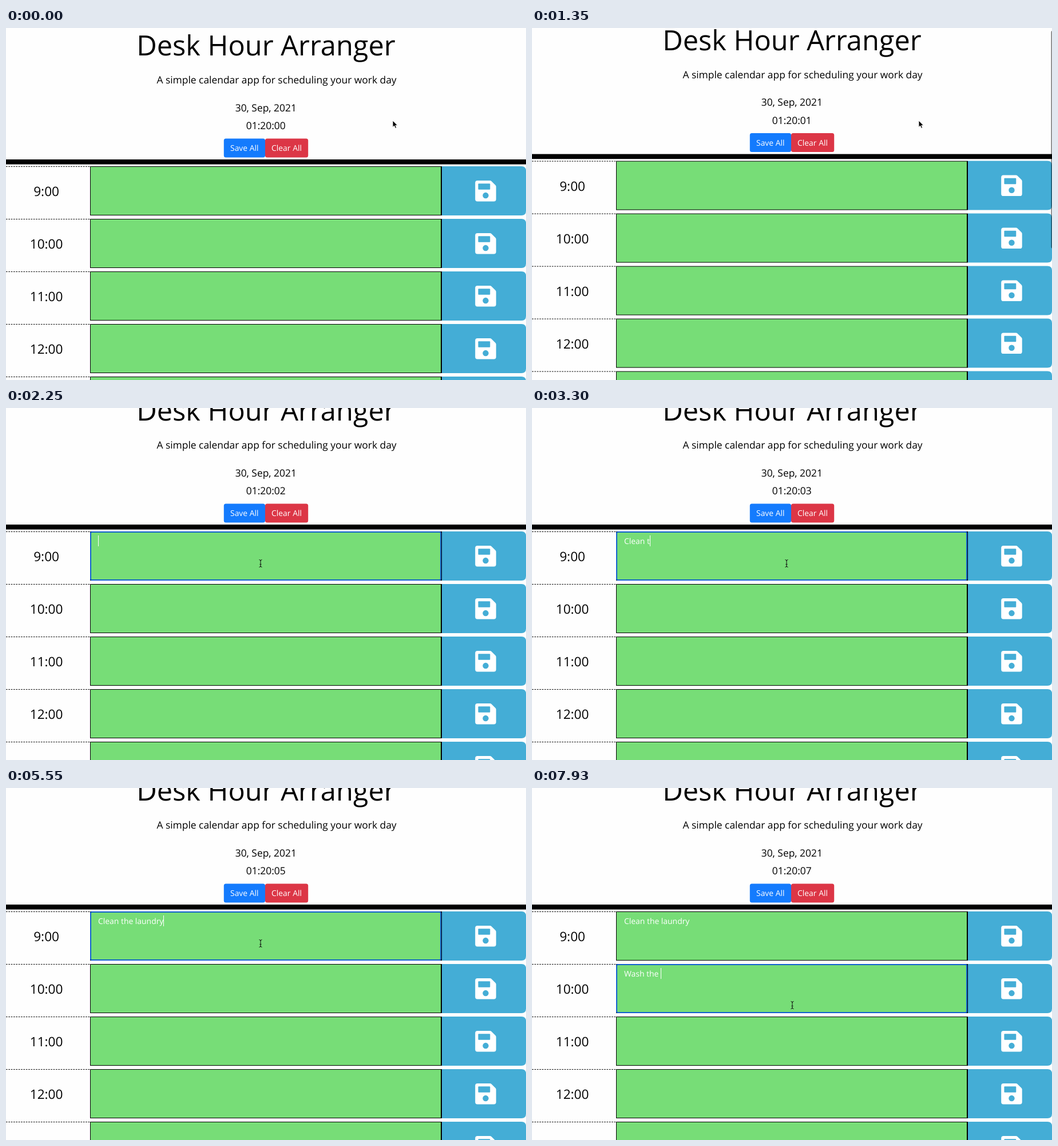
Animation, 909 px wide and 616 px high, one loop 8000 ms. Source, as an HTML page:

```html
<!DOCTYPE html>
<html lang="en">
<head>
<meta charset="utf-8">
<title>Day planner</title>
<style>
  html, body { margin: 0; width: 100%; height: 100%; overflow: hidden; background: #fefefe; }
  svg { display: block; width: 909px; height: 616px; }
  text {
    font-family: "Open Sans", "Noto Sans", sans-serif;
    text-rendering: geometricPrecision;
    white-space: pre;
  }
  .mid { text-anchor: middle; }
  .lead { font-size: 17.4px; }
  .small { font-size: 13.92px; fill: #fff; }
  .hour { font-size: 22.6px; }
</style>
</head>
<body>
<svg viewBox="0 0 909 616">
  <defs>
    <g id="disk" transform="translate(820.2 22.4) scale(.0815)">
      <path fill="#fff" d="M48 32H316q20 0 34 14l84 84q14 14 14 34V432a48 48 0 0 1-48 48H48a48 48 0 0 1-48-48V80a48 48 0 0 1 48-48z"/>
      <rect x="64" y="96" width="256" height="128" rx="12" fill="#44add6"/>
      <circle cx="224" cy="352" r="64" fill="#44add6"/>
    </g>
  </defs>
  <g id="page">
    <text class="mid" x="454.5" y="48" font-size="48.7">Desk Hour Arranger</text>
    <text class="lead" x="263.4" y="97">A simple calendar app for scheduling your work day</text>
    <text class="lead mid" x="454.3" y="145.8">30, Sep, 2021</text>
    <text class="lead mid" x="454.3" y="177" id="clock"></text>
    <rect x="380.8" y="193.5" width="72.2" height="33" rx="3.5" fill="#147bfd"/>
    <rect x="453" y="193.5" width="75.2" height="33" rx="3.5" fill="#dc3646"/>
    <text class="small mid" x="416.8" y="215.2">Save All</text>
    <text class="small mid" x="490.5" y="215.2">Clear All</text>
    <rect y="230" width="909" height="8.6"/>
    <g id="rows"></g>
    <rect id="ring" x="148" width="612" height="84" rx="2" fill="none" stroke="#1160cf" stroke-width="2"/>
    <rect id="caret" width="1" height="19" fill="#fff"/>
  </g>
  <rect id="thumb" x="907.4" width="7" height="382" rx="3.5"/>
  <path id="arrow" d="M0 0V11.6L2.7 9.1L4.5 13.4L6.6 12.5L4.8 8.4H8.4Z" stroke="#fff" stroke-width=".9"/>
  <path id="beam" d="M-2.5-6.5Q0-6.5 0-4.5Q0-6.5 2.5-6.5M0-5V5M-2.5 6.5Q0 6.5 0 4.5Q0 6.5 2.5 6.5M-1.5 1.5H1.5" fill="none" stroke="#111" stroke-width="1"/>
</svg>
<script>
const LOOP = 8000, TOP = 242, PITCH = 92;
const el = id => document.getElementById(id);
const set = (node, attrs) => { for (const k in attrs) node.setAttribute(k, attrs[k]); };
const show = (node, on) => node.setAttribute('visibility', on ? 'visible' : 'hidden');

el('rows').innerHTML = [9, 10, 11, 12, 13].map((hour, i) => `
  <g transform="translate(0 ${TOP + i * PITCH})">
    <path d="M0 .5H147" stroke="#000" stroke-dasharray="2.6 1.75"/>
    <text class="hour mid" x="70.6" y="52.2">${hour}:00</text>
    <rect x="147.5" y=".5" width="613" height="85" fill="#77dd77" stroke="#000"/>
    <path d="M762 0H901q8 0 8 8V78q0 8-8 8H762z" fill="#44add6"/>
    <rect x="761" width="1" height="86"/>
    <use href="#disk" y="-20"/>
    <text class="small note" x="161" y="21.8"></text>
  </g>`).join('');
// The icon is defined for a row whose top lies 20 px lower.
document.querySelectorAll('use').forEach(u => u.setAttribute('y', 0));
const notes = document.querySelectorAll('.note');

const pen = document.createElement('canvas').getContext('2d');
pen.font = '13.92px "Open Sans", "Noto Sans", sans-serif';
pen.textRendering = 'geometricPrecision';

// Full lines; each step tells how many letters are typed.
const lines = ['Clean the laundry', 'Wash the '];

// Each step overrides only what changes at its time.
const steps = [
  [0, { sec: 0, scroll: 0, bar: 0, focus: -1, caret: 0, a: 0, b: 0, arrow: 1, x: 676, y: 162 }],
  [1200, { sec: 1, scroll: 2, bar: .5 }],
  [1350, { scroll: 9.4 }],
  [1500, { scroll: 26 }],
  [1650, { x: 604, y: 192 }],
  [1800, { arrow: 0, x: 462, y: 262 }],
  [2100, { sec: 2, x: 445, y: 272, bar: .2, focus: 0, caret: 1 }],
  [2250, { bar: 0 }],
  [2550, { a: 1 }],
  [2700, { a: 2 }],
  [2850, { a: 3 }],
  [3000, { a: 4, sec: 3 }],
  [3150, { a: 6 }],
  [3300, { a: 7 }],
  [3450, { a: 8 }],
  [3600, { a: 10 }],
  [3900, { a: 11, sec: 4 }],
  [4050, { a: 12 }],
  [4350, { a: 13 }],
  [4650, { a: 15, sec: 5 }],
  [4800, { caret: 0 }],
  [5100, { a: 16, caret: 1 }],
  [5250, { a: 17 }],
  [5700, { sec: 6 }],
  [5850, { caret: 0, x: 446, y: 284 }],
  [5990, { x: 449, y: 315 }],
  [6140, { x: 452, y: 343 }],
  [6290, { x: 455, y: 374 }],
  [6440, { y: 380 }],
  [6590, { focus: 1, caret: 1 }],
  [6740, { sec: 7 }],
  [7040, { b: 1 }],
  [7190, { b: 2 }],
  [7340, { b: 3 }],
  [7490, { b: 4 }],
  [7640, { b: 6 }],
  [7780, { b: 7 }],
  [7930, { b: 9 }]
];

function stateAt(t) {
  const s = {};
  for (const [at, change] of steps) {
    if (at > t) break;
    Object.assign(s, change);
  }
  return s;
}

function draw(t) {
  const s = stateAt(t);
  const typed = [lines[0].slice(0, s.a), lines[1].slice(0, s.b)];
  const top = TOP + s.focus * PITCH;
  const focused = s.focus >= 0;

  set(el('page'), { transform: `translate(0 ${-s.scroll})` });
  el('clock').textContent = '01:20:0' + s.sec;
  typed.forEach((str, i) => { notes[i].textContent = str; });

  show(el('ring'), focused);
  show(el('caret'), focused && s.caret);
  if (focused) {
    set(el('ring'), { y: top + 1 });
    set(el('caret'), { x: Math.round(161 + pen.measureText(typed[s.focus]).width), y: top + 7 });
  }

  set(el('thumb'), { y: Math.max(1, .61 * s.scroll - 1.5), 'fill-opacity': s.bar });
  for (const id of ['arrow', 'beam']) {
    show(el(id), (id === 'arrow') === !!s.arrow);
    set(el(id), { transform: `translate(${s.x} ${s.y})` });
  }
}

function tick() {
  draw(performance.now() % LOOP);
  requestAnimationFrame(tick);
}
tick();
</script>
</body>
</html>
```
